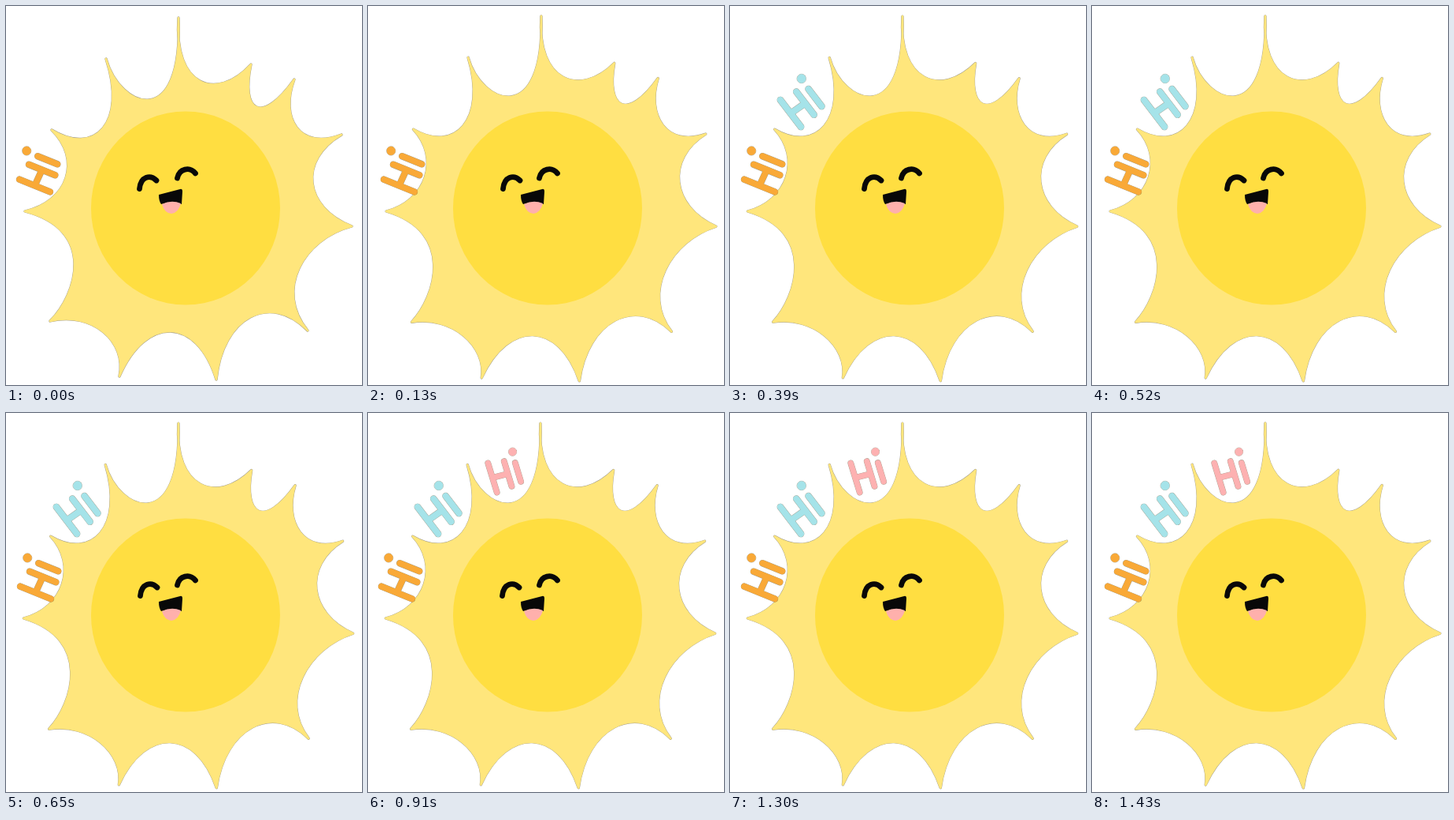
An HTML page with a canvas that plays this animation: 452 px wide and 480 px high, repeating every 1.56 s.

```html
<!DOCTYPE html>
<html lang="en">
<head>
<meta charset="utf-8">
<title>Hi from the sun</title>
<style>
  html, body { margin: 0; width: 100%; height: 100%; overflow: hidden; background: #fff; }
  canvas { display: block; }
</style>
</head>
<body>
<canvas id="stage" width="452" height="480" role="img" aria-label="Hi Hi Hi"></canvas>
<script>
const ctx = document.getElementById('stage').getContext('2d');
const STEP = 130;
const EDGE = 'rgba(70, 60, 25, .5)';
const CX = 228, CY = 256;

// Clockwise from the top: ray tip, middle of the bay after it, lean of that bay.
const rays = [
  [219, 15, 246, 95, -6], [311, 74, 318, 128, 4], [366, 93, 369, 154, 4],
  [426, 163, 389, 224, 0], [439, 279, 372, 332, 4], [383, 411, 310, 394, 0],
  [267, 473, 209, 412, 0], [144, 469, 124, 413, 2], [56, 399, 87, 326, 22],
  [24, 260, 76, 218, 0], [58, 157, 123, 155, 4], [127, 67, 182, 119, 33]
];

// How each drawing of the picture deviates from the first.
const poses = {
  a: { tip: 1, bay: 1, sunX: 0, eye: 0, wordX: 0 },
  b: { tip: 1.008, bay: 1.03, sunX: 0, eye: 1, wordX: 1 },
  c: { tip: 1.009, bay: 1.03, sunX: 1, eye: 2, wordX: 3 },
  d: { tip: 1.008, bay: 1.03, sunX: 0, eye: 1, wordX: 0 }
};
const order = 'acabcbcdcdbc';

// Position is the middle of the H's left stem.
const words = [
  { color: '#f9a937', x: 36.5, y: 227.5, angle: -68, size: 1 },
  { color: '#a5e3e9', x: 76, y: 136, angle: -37.5, size: 1.02 },
  { color: '#fdb1b1', x: 158, y: 82, angle: -17, size: .92 }
];

function stroke(path, color, width) {
  ctx.strokeStyle = color;
  ctx.lineWidth = width;
  ctx.stroke(path);
}

function fill(path, color) {
  ctx.fillStyle = color;
  ctx.fill(path);
}

function drawRays({ tip, bay, sunX }) {
  const grow = (x, y, k) => [CX + sunX + (x - CX) * k, CY + (y - CY) * k];
  const tips = rays.map(([x, y]) => grow(x, y, tip));
  const path = new Path2D();
  path.moveTo(...tips[0]);
  rays.forEach(([, , x, y, lean], i) => {
    const [x0, y0] = tips[i], [x1, y1] = tips[(i + 1) % tips.length];
    const [mx, my] = grow(x, y, bay);
    const dx = x1 - x0, dy = y1 - y0, len = Math.hypot(dx, dy);
    // The curve passes through (mx, my) halfway.
    const sx = (8 * mx - x0 - x1) / 6, sy = (8 * my - y0 - y1) / 6;
    const ox = .26 * dx - lean * dy / len, oy = .26 * dy + lean * dx / len;
    path.bezierCurveTo(sx - ox, sy - oy, sx + ox, sy + oy, x1, y1);
  });
  path.closePath();
  stroke(path, EDGE, 3.3);
  stroke(path, '#ffe67c', 2.5);
  fill(path, '#ffe67c');
}

function drawFace({ eye }) {
  const disc = new Path2D();
  disc.ellipse(CX, CY, 120, 122.5, 0, 0, Math.PI * 2);
  fill(disc, '#ffde41');

  const eyes = new Path2D('M217.5 218C220 206 233 203 240.5 212');
  eyes.addPath(new Path2D('M169.5 231.5C171 216 183 213 191 221'), { e: eye });
  stroke(eyes, '#080808', 6.8);

  fill(new Path2D('M194 239L221 232Q224 231 224 235L223 251Q210 246 197 251Q194 247 194 239Z'), '#080808');
  fill(new Path2D('M198 251Q210 245 222 250Q219 262 210 263Q201 262 198 251Z'), '#ffb0ac');
}

function drawWord({ color, x, y, angle, size }, { wordX }) {
  const path = new Path2D();
  const stem = (sx, sy, half) => { path.moveTo(sx, sy - half); path.lineTo(sx, sy + half); };
  stem(0, 0, 21);
  stem(22, 1, 18);
  stem(36, 3, 13.5);
  path.moveTo(0, 0);
  path.lineTo(22, 1);
  const dot = new Path2D();
  dot.arc(37, -26, 5.6, 0, Math.PI * 2);

  ctx.save();
  ctx.translate(x + wordX, y);
  ctx.rotate(angle * Math.PI / 180);
  ctx.scale(size, size);
  stroke(dot, EDGE, .7);
  stroke(path, EDGE, 8.5);
  stroke(path, color, 7.8);
  fill(dot, color);
  ctx.restore();
}

function draw(now) {
  const i = Math.floor(now / STEP) % order.length;
  const pose = poses[order[i]];
  const count = Math.min(3, 1 + Math.floor(i / 3));
  ctx.clearRect(0, 0, 452, 480);
  ctx.lineCap = ctx.lineJoin = 'round';
  drawRays(pose);
  drawFace(pose);
  words.slice(0, count).forEach(word => drawWord(word, pose));
}

let start;
function tick(now) {
  start ??= now;
  draw(now - start);
  requestAnimationFrame(tick);
}
draw(0);
requestAnimationFrame(tick);
</script>
</body>
</html>
```
